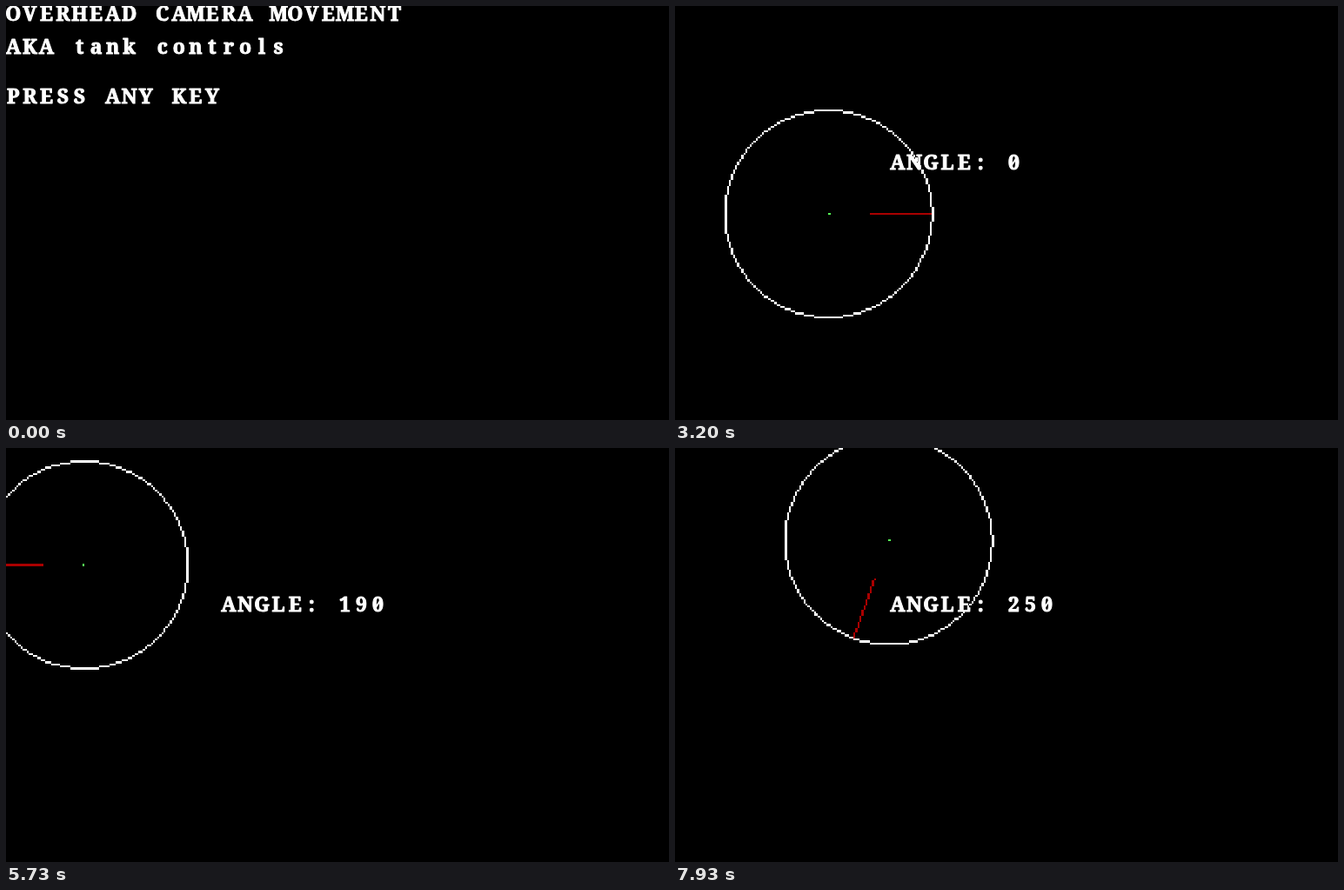
An HTML page with a canvas that plays this animation: 762x476 px, repeating every 8 s.

```html
<!DOCTYPE html>
<html lang="en">
<head>
<meta charset="utf-8">
<title>Overhead camera movement</title>
<style>
html, body { margin: 0; width: 100%; height: 100%; overflow: hidden; background: #000; }
canvas { display: block; }
</style>
</head>
<body>
<canvas id="stage" width="762" height="476"></canvas>
<script>
const LOOP = 8000, TICK = 1000 / 15;
const COLS = 320, ROWS = 200, RADIUS = 50;
const DIAL_AT = 2530, DRIVE_AT = 2540, TEXT_LAG = 60;
const SPEED = 0.04; // low-res pixels per ms

const stage = document.getElementById('stage');
const ctx = stage.getContext('2d');
const sx = stage.width / COLS, sy = stage.height / ROWS;

const low = document.createElement('canvas');
low.width = COLS;
low.height = ROWS;
const pen = low.getContext('2d');

// Steering: time and heading in degrees, turning evenly in between.
const steering = [
  [4050, 360], [4110, 350], [4200, 350], [5070, 248], [5350, 235], [5730, 180],
  [5915, 180], [6300, 135], [6800, 162], [7000, 180], [7360, 249]
];

const rad = deg => deg * Math.PI / 180;
const snap = deg => Math.round(deg / 10) * 10 % 360;

function heading(t) {
  const i = steering.findIndex(key => key[0] > t);
  if (i === 0) return steering[0][1];
  if (i < 0) return steering[steering.length - 1][1];
  const [t0, a] = steering[i - 1], [t1, b] = steering[i];
  return a + (b - a) * (t - t0) / (t1 - t0);
}

// The dial drifts against the heading at constant speed.
function position(end) {
  const step = 10;
  let x = 100, y = 100;
  for (let t = DRIVE_AT; t < end; t += step) {
    const h = rad(heading(t + step / 2));
    x -= Math.cos(h) * SPEED * step;
    y += Math.sin(h) * SPEED * step;
  }
  return { x, y };
}

const dot = (x, y) => pen.fillRect(Math.round(x), Math.round(y), 1, 1);

function line(x0, y0, x1, y1) {
  const n = Math.ceil(Math.max(Math.abs(x1 - x0), Math.abs(y1 - y0)));
  for (let i = 0; i <= n; i++) {
    dot(x0 + (x1 - x0) * i / n, y0 + (y1 - y0) * i / n);
  }
}

function circle(cx, cy, r) {
  const half = Math.ceil(r * Math.SQRT1_2);
  const reach = d => Math.sqrt(r * r - d * d);
  for (let i = -half; i <= half; i++) {
    const x = Math.round(cx) + i, y = Math.round(cy) + i;
    for (const side of [-1, 1]) {
      dot(x, cy + side * reach(x - cx));
      dot(cx + side * reach(y - cy), y);
    }
  }
}

// One character per 8 x 8 cell.
function print(text, col, row) {
  const base = (row * 8 + 7) * sy;
  [...text].forEach((ch, i) => {
    const x = ((col + i) * 8 + 3.5) * sx;
    ctx.fillText(ch, x, base);
    ctx.lineWidth = 1;
    ctx.strokeText(ch, x, base);
    if (ch === '0') {
      ctx.lineWidth = 2;
      ctx.beginPath();
      ctx.moveTo(x - 3, base - 4);
      ctx.lineTo(x + 3, base - 13);
      ctx.stroke();
    }
  });
}

function drawDial(t) {
  const { x, y } = position(t);
  const h = rad(snap(heading(t))), c = Math.cos(h), s = -Math.sin(h);
  const at = r => [x + c * r, y + s * r];
  pen.clearRect(0, 0, COLS, ROWS);
  pen.fillStyle = '#a00';
  line(...at(20), ...at(RADIUS));
  pen.fillStyle = '#fff';
  circle(x, y, RADIUS);
  pen.fillStyle = '#5f5';
  dot(x, y);
  ctx.imageSmoothingEnabled = false;
  ctx.drawImage(low, 0, 0, stage.width, stage.height);
}

function draw(time) {
  const tick = Math.floor((time % LOOP + 5) / TICK);
  const t = Math.round(tick * TICK / 10) * 10 % LOOP;
  ctx.fillStyle = '#000';
  ctx.fillRect(0, 0, stage.width, stage.height);
  ctx.fillStyle = ctx.strokeStyle = '#fff';
  ctx.lineJoin = 'round';
  ctx.font = '900 23px "Noto Serif", serif';
  ctx.textAlign = 'center';
  if (t <= DIAL_AT) {
    print('OVERHEAD CAMERA MOVEMENT', 0, 0);
    print('AKA tank controls', 0, 2);
    print('PRESS ANY KEY', 0, 5);
  } else {
    print('ANGLE: ' + snap(heading(t - TEXT_LAG)), 13, 9);
  }
  if (t >= DIAL_AT) drawDial(t);
}

function loop() {
  draw(performance.now());
  requestAnimationFrame(loop);
}
loop();
</script>
</body>
</html>
```
